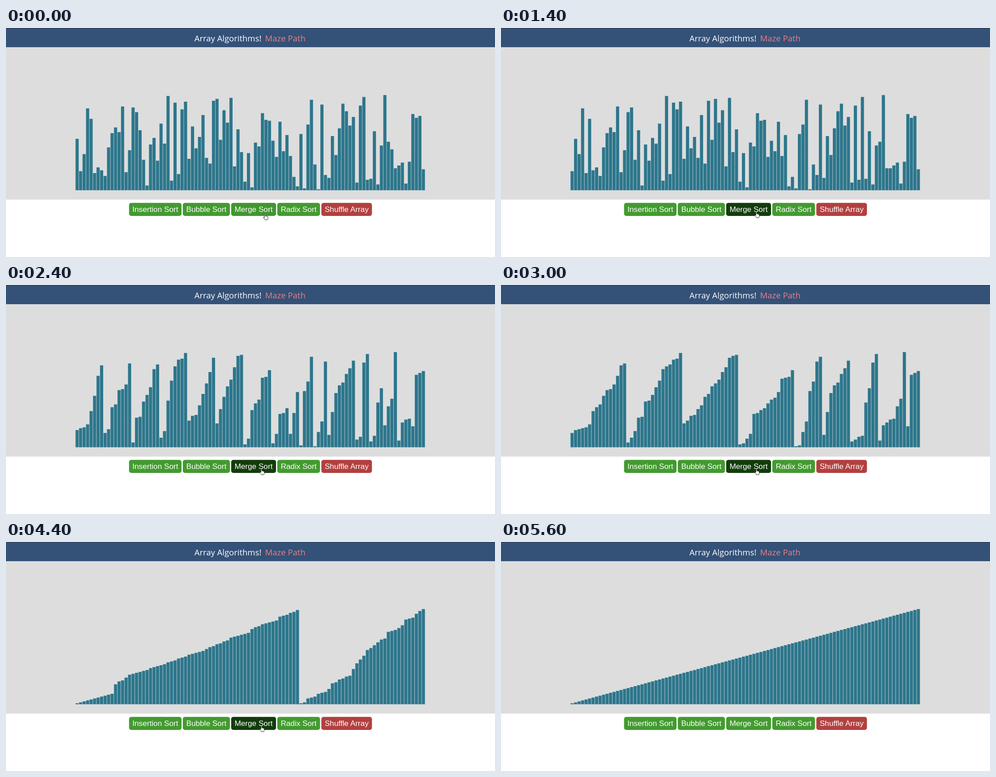
An HTML page for the animation above (6 s loop, 1092x513 px).

```html
<!DOCTYPE html>
<html lang="en">
<head>
<meta charset="utf-8">
<title>Array Algorithms</title>
<style>
  html, body { margin: 0; width: 100%; height: 100%; overflow: hidden; background: #fff; }
  svg { display: block; }
  .title { font: 18.5px "Open Sans", "Noto Sans", sans-serif; }
  .label { font: 17.2px "Liberation Sans", Arial, sans-serif; fill: #fff; text-anchor: middle; }
  .cursor { fill: #fff; stroke: #111; stroke-width: .9; stroke-linejoin: round; }
</style>
</head>
<body>
<svg width="1092" height="513" viewBox="0 0 1092 513">
  <rect width="1092" height="43" fill="#345178"/>
  <rect width="1092" height="1" fill="#222f42"/>
  <rect y="43" width="1092" height="341.4" fill="#ddd"/>
  <text class="title" x="420.7" y="30" fill="#fff">Array Algorithms!</text>
  <text class="title" x="578.6" y="30" fill="#e88085">Maze Path</text>
  <path id="bars" fill="#2d768c"/>
  <g id="buttons"></g>
  <path id="hand" class="cursor" d="M-1 1.2Q0-.8 1.1 1.2V5Q2.3 4.3 3 5.4Q4.3 4.8 5 6Q6.4 5.6 6.6 7V9.6Q6.5 11.6 5.2 13.4H.2Q-1.4 11-3.4 8.2Q-3.7 6.4-2.2 7.1L-1 8.3Z"/>
  <path id="arrow" class="cursor" d="M0 0V12.5L2.9 9.8L4.9 14.2L6.8 13.3L4.9 9.1H8.8Z"/>
</svg>
<script>
  const STEP = 200, LOOP = 6000;
  const GREEN = "#439b30", DARK = "#133c0c", MID = "#2b6b1e";

  const start = [
    54, 20, 38, 86, 75, 18, 24, 21, 15, 45, 60, 66, 61, 88, 19, 42, 87, 82, 63, 32,
    5, 48, 55, 31, 70, 49, 99, 10, 92, 17, 85, 93, 33, 67, 44, 56, 79, 34, 28, 94,
    96, 53, 84, 71, 97, 25, 64, 40, 9, 39, 3, 50, 46, 81, 74, 73, 52, 35, 72, 41,
    58, 36, 14, 4, 59, 2, 69, 95, 27, 1, 90, 16, 13, 57, 37, 65, 91, 83, 68, 77,
    8, 89, 98, 11, 12, 62, 6, 47, 100, 51, 43, 23, 26, 29, 7, 30, 80, 76, 78, 22
  ];

  // Bottom-up merge sort, recorded as single in-place writes [index, value]
  function recordWrites(values) {
    const a = [...values], writes = [];
    for (let w = 1; w < a.length; w *= 2) {
      for (let lo = 0; lo < a.length; lo += 2 * w) {
        const left = a.slice(lo, lo + w), right = a.slice(lo + w, lo + 2 * w);
        for (let k = lo; left.length || right.length; k++) {
          const fromLeft = !right.length || left[0] <= right[0];
          a[k] = (fromLeft ? left : right).shift();
          writes.push([k, a[k]]);
        }
      }
    }
    return writes;
  }
  const writes = recordWrites(start);

  // Progress of the sort: [step, writes done]
  const pace = [[4, 0], [5, 23], [7, 91], [12, 261], [15, 365], [19, 506], [22, 611], [25, 700]];
  function writesAt(step) {
    if (step <= pace[0][0]) return 0;
    const i = pace.findIndex(p => p[0] >= step);
    if (i < 0) return writes.length;
    const [s0, w0] = pace[i - 1], [s1, w1] = pace[i];
    return Math.round(w0 + (w1 - w0) * (step - s0) / (s1 - s0));
  }

  const byId = id => document.getElementById(id);

  byId("buttons").innerHTML = [
    ["Insertion Sort", 274.8, 117.2], ["Bubble Sort", 394.8, 105.2], ["Merge Sort", 502.8, 100.2],
    ["Radix Sort", 605.8, 95.4], ["Shuffle Array", 704.2, 113]
  ].map(([name, x, w], i) =>
    `<rect x="${x}" y="391.8" width="${w}" height="29.2" rx="5" fill="${i == 4 ? "#b2403f" : GREEN}"/>` +
    `<text class="label" x="${x + w / 2}" y="411.9">${name}</text>`
  ).join("");
  const mergeButton = document.querySelectorAll("#buttons rect")[2];

  function drawBars(count) {
    const a = [...start];
    for (const [k, v] of writes.slice(0, count)) a[k] = v;
    byId("bars").setAttribute("d", a.map((v, i) => {
      const h = (v * 2.132).toFixed(2);
      return `M${(155.3 + i * 7.81).toFixed(2)} 363.4v-${h}h7.03v${h}z`;
    }).join(""));
  }

  function place(id, pos) {
    byId(id).setAttribute("visibility", pos ? "visible" : "hidden");
    if (pos) byId(id).setAttribute("transform", `translate(${pos})`);
  }

  function buttonColor(step) {
    if (step == 0) return "#419630";
    if (step == 1 || step == 26) return MID;
    return step < 26 ? DARK : GREEN;
  }

  function draw(step) {
    drawBars(writesAt(step));
    mergeButton.setAttribute("fill", buttonColor(step));
    const hand = step == 0 ? [578.3, 416.4] : step == 1 ? [573, 413.5] : [570.2, 411.6];
    place("hand", step < 26 && hand);
    place("arrow", step == 26 ? [345, 455] : step == 27 && [66.5, 500]);
  }

  let shown = -1;
  function tick() {
    const step = Math.floor(performance.now() % LOOP / STEP);
    if (step != shown) draw(shown = step);
    requestAnimationFrame(tick);
  }
  tick();
</script>
</body>
</html>
```
